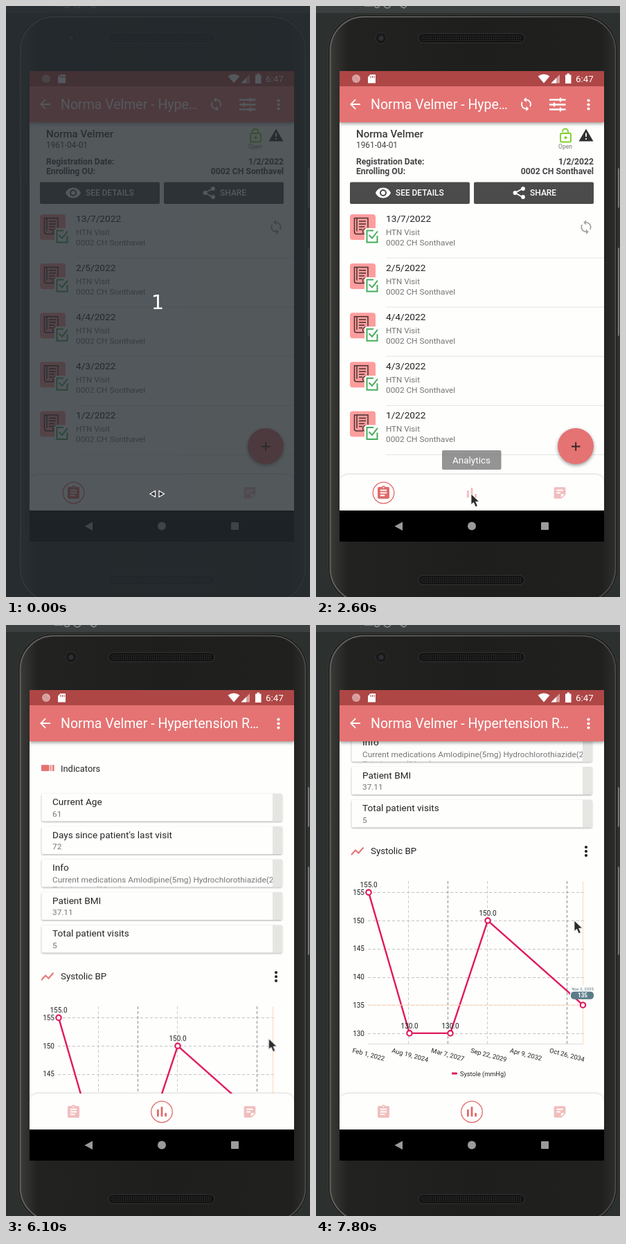
Write an HTML page that moves like this. It is 439 px wide and 854 px high and loops after 8000 ms.

```html
<!DOCTYPE html>
<html lang="en">
<head>
<meta charset="utf-8">
<title>Patient dashboard</title>
<style>
html, body { margin: 0; width: 100%; height: 100%; overflow: hidden; background: #2c302f; }
svg { display: block; width: 439px; height: 854px; font-family: Roboto, sans-serif; }
svg svg { width: auto; height: auto; }
.b { font-weight: 700; }
.m { font-weight: 500; }
.mid { text-anchor: middle; }
.end { text-anchor: end; }
.shadow { filter: drop-shadow(0 1px 1px rgba(0,0,0,.35)); }
.deep { filter: drop-shadow(0 2px 2.5px rgba(0,0,0,.4)); }

/* 1.25% of the loop is 100 ms; steps() keeps the ten pictures a second */
#dim, #cursor, #ripple, #tip, #list, #charts, #scroll, #marker,
#bar1, #bar2, #tab1, #tab2, #ring1, #ring2 { animation: 8s infinite linear; }

#dim { animation-name: dim; }
@keyframes dim {
  0% { opacity: 1; animation-timing-function: step-end; }
  1.25%, 100% { opacity: 0; }
}
#cursor { animation-name: cursor; }
@keyframes cursor {
  0% { opacity: 0; transform: translate(224px,705px); animation-timing-function: step-end; }
  5% { opacity: 1; transform: translate(224px,705px); }
  51.25% { transform: translate(224px,705px); animation-timing-function: steps(3); }
  55% { transform: translate(317px,592px); animation-timing-function: steps(3); }
  58.75% { transform: translate(381px,633px); }
  73.75% { transform: translate(381px,633px); animation-timing-function: steps(6); }
  81.25% { transform: translate(376px,527px); animation-timing-function: steps(5); }
  87.5% { transform: translate(374px,437px); animation-timing-function: steps(2); }
  90%, 100% { opacity: 1; transform: translate(373px,427px); }
}
#ripple { animation-name: ripple; transform-origin: 225px 703px; }
@keyframes ripple {
  0%, 3.75% { opacity: 0; transform: scale(.3); animation-timing-function: steps(3); }
  7.5% { opacity: 1; transform: scale(1); }
  23.75% { opacity: 1; transform: scale(1); animation-timing-function: steps(3); }
  27.5%, 100% { opacity: 0; transform: scale(1); }
}
#tip { animation-name: tip; }
@keyframes tip {
  0%, 7.5% { opacity: 0; animation-timing-function: steps(5); }
  13.75% { opacity: 1; }
  31.25% { opacity: 1; animation-timing-function: steps(4); }
  36.25%, 100% { opacity: 0; }
}
#list { animation-name: leave; }
@keyframes leave {
  0%, 36.25% { transform: none; animation-timing-function: steps(5); }
  42.5%, 100% { transform: translateX(-382px); }
}
#charts { animation-name: enter; }
@keyframes enter {
  0%, 36.25% { transform: translateX(382px); animation-timing-function: steps(5); }
  42.5%, 100% { transform: none; }
}
#scroll { animation-name: scroll; }
@keyframes scroll {
  0%, 75% { transform: none; animation-timing-function: steps(5); }
  81.25% { transform: translateY(-89.5px); animation-timing-function: steps(5); }
  87.5% { transform: translateY(-176.5px); animation-timing-function: steps(2); }
  90% { transform: translateY(-196.5px); }
  95% { transform: translateY(-196.5px); animation-timing-function: steps(2); }
  97.5%, 100% { transform: translateY(-199px); }
}
#marker { animation-name: marker; animation-timing-function: step-end; }
@keyframes marker { 0% { opacity: 0; } 75%, 100% { opacity: 1; } }

#bar1, #bar2, #tab1, #tab2, #ring1 { animation-timing-function: step-end; }
#bar1, #ring1 { animation-name: hide; }
#bar2 { animation-name: show; }
@keyframes hide { 0% { opacity: 1; } 37.5%, 100% { opacity: 0; } }
@keyframes show { 0% { opacity: 0; } 37.5%, 100% { opacity: 1; } }
#tab1 { animation-name: tabOff; }
#tab2 { animation-name: tabOn; }
@keyframes tabOff { 0% { fill: #e06a69; } 37.5%, 100% { fill: #f1bdbd; } }
@keyframes tabOn { 0% { fill: #fff; } 1.25% { fill: #f1bdbd; } 37.5%, 100% { fill: #e06a69; } }
#ring2 { animation-name: ring; transform-origin: 225px 703px; }
@keyframes ring {
  0%, 37.5% { opacity: 0; transform: scale(.5); animation-timing-function: steps(5); }
  43.75%, 100% { opacity: 1; transform: scale(1); }
}
</style>
</head>
<body>
<svg id="stage" viewBox="0 0 439 854" xmlns="http://www.w3.org/2000/svg"></svg>
<script>
const PATIENT = 'Norma Velmer', UNIT = '0002 CH Sonthavel';
const RED = '#e57373', LINE = '#e0195e', INK = '#222', GREY = '#767676', PAPER = '#fefefd';

const text = (x, y, s, size, fill = INK, cls = '', more = '') =>
  `<text x="${x}" y="${y}" font-size="${size}" fill="${fill}" class="${cls}" ${more}>${s}</text>`;
const rect = (x, y, w, h, fill, rx = 0, more = '') =>
  `<rect x="${x}" y="${y}" width="${w}" height="${h}" rx="${rx}" fill="${fill}" ${more}/>`;
const circle = (x, y, r, fill, more = '') => `<circle cx="${x}" cy="${y}" r="${r}" fill="${fill}" ${more}/>`;
const path = (d, fill = 'none', more = '') => `<path d="${d}" fill="${fill}" ${more}/>`;
const stroke = (d, colour, width, more = '') => path(d, 'none', `stroke="${colour}" stroke-width="${width}" ${more}`);
const icon = (d, x, y, k, fill) => path(d, fill, `transform="translate(${x - 12 * k} ${y - 12 * k}) scale(${k})"`);
const group = (id, s, more = '') => `<g id="${id}" ${more}>${s}</g>`;
const dots = (x, y, fill) => [-6, 0, 6].map(d => circle(x, y + d, 2.1, fill)).join('');

const SYNC = 'M12 4V1L8 5l4 4V6c3.31 0 6 2.69 6 6 0 1-.25 2-.7 2.8l1.46 1.46C19.54 15 20 13.6 20 12c0-4.42-3.58-8-8-8zm0 14c-3.31 0-6-2.69-6-6 0-1 .25-2 .7-2.8L5.24 7.74C4.46 9 4 10.4 4 12c0 4.42 3.58 8 8 8v3l4-4-4-4v3z';
const BACK = 'M20 11H7.8l5.6-5.6L12 4l-8 8 8 8 1.4-1.4L7.8 13H20z';
const EYE = 'M12 4.5C7 4.5 2.7 7.6 1 12c1.7 4.4 6 7.5 11 7.5s9.3-3.1 11-7.5c-1.7-4.4-6-7.5-11-7.5zM12 17a5 5 0 1 1 0-10 5 5 0 0 1 0 10zm0-8a3 3 0 1 0 0 6 3 3 0 0 0 0-6z';
const CLIP = 'M19 3h-4.2a3 3 0 0 0-5.6 0H5a2 2 0 0 0-2 2v14c0 1.1.9 2 2 2h14a2 2 0 0 0 2-2V5a2 2 0 0 0-2-2zm-7 0a1 1 0 1 1 0 2 1 1 0 0 1 0-2zm2 14H7v-2h7zm3-4H7v-2h10zm0-4H7V7h10z';
const NOTE = 'M5 3h14a2 2 0 0 1 2 2v10l-6 6H5a2 2 0 0 1-2-2V5a2 2 0 0 1 2-2zm2 4v2h10V7zm0 4v2h6v-2zm7 8.5 5.5-5.5H14z';

function phone() {
  const grille = y => rect(148, y, 153, 13, '#111', 6.5, 'stroke="#353535"') + rect(151, y + 2, 147, 9, 'url(#mesh)', 4);
  return rect(0, 0, 439, 854, '#2c302f') + rect(0, 0, 439, 10, '#3c4040') +
    stroke('M70 0h12M84 0q4 5 8 0M98 0q5 6 10 0M122 0l5 3 4-3', '#8a8d8f', 1.5) +
    rect(434, 234, 4, 58, '#747675', 2) + rect(434, 349, 4, 128, '#747675', 2) +
    rect(17.5, 12.5, 418, 852, '#171717', 52, 'stroke="#3a3b39"') +
    rect(20.5, 15.5, 412, 846, 'url(#body)', 49, 'stroke="url(#rim)" stroke-width="2"') +
    circle(94, 46.5, 8, '#191919', 'stroke="#303030"') + circle(94, 46.5, 3.5, '#2c3034') +
    grille(40) + grille(823);
}

function statusBar() {
  return rect(34, 94, 382, 22, '#ae4646') +
    circle(58, 105, 6, '#dba7a7') + stroke('M54 103l7 6M56 101l6 6M53 106l4 4', '#c98383', 1) +
    path('M78.5 99H86v12.5H75v-9z', '#fff') + stroke('M79 101v3M81.5 101v3M84 101v3', '#ae4646', 1) +
    path('M320.5 101.5q8.5-6 17 0L329 111.5z', '#fff') +
    path('M352 99v12.5h-12.5z', '#d79f9f') + path('M347 104v7.5h-7.5z', '#fff') +
    path('M360 99.5h2.5v-2h3.5v2h2.5v12.5H360z', '#fff') +
    text(375, 110, '6:47', 13.3, '#fff');
}

function toolbar() {
  const sliders = [[135.5, 353], [142.5, 344], [149.5, 353]].map(([y, x]) =>
    stroke(`M337 ${y}h23.5M${x} ${y - 3}v6`, '#fff', 2.3)).join('');
  return rect(34, 116, 382, 52, RED, 0, 'class="deep"') +
    icon(BACK, 56.5, 142, .93, '#fff') + dots(393.5, 142.5, '#fff') +
    group('bar1', text(79, 148.5, PATIENT + ' - Hype…', 19.5, '#fff') +
      icon(SYNC, 303.5, 142, .93, '#fff') + sliders) +
    group('bar2', text(79, 148.5, PATIENT + ' - Hypertension R…', 19.5, '#fff'));
}

function visit(date, i) {
  return `<g transform="translate(0 ${i * 71.1})">` +
    rect(49, 301, 37, 37, '#fd9d9d', 4) +
    stroke('M68 329.5H58.5q-3 0-3-3V306.5h19.5v14M59 306.5v19M62 311h10M62 315h10M62 319h8M62 323h5', '#493131', 1.5) +
    circle(71.5, 326, 4, 'none', 'stroke="#493131" stroke-width="1.4"') +
    rect(70, 321, 21.5, 23, PAPER, 4) +
    stroke('M83 324.5H73.5v17H88.5V332M76.5 331l4.500 4.500 8-10', '#45ac5c', 2) +
    text(101, 312, date, 13.7) + text(101, 330.5, 'HTN Visit', 11.6, GREY) + text(101, 346, UNIT, 11.8, GREY) +
    rect(101, 363.5, 315, 1, '#e3e3e3') + '</g>';
}

function listPage() {
  const label = '#444';
  return text(58, 189.5, PATIENT, 15, '#3b3b3b', 'm') + text(58, 205, '1961-04-01', 11.9, label) +
    rect(353, 184, 15, 12.5, 'none', 1.5, 'stroke="#7fd02b" stroke-width="1.9"') +
    stroke('M356 182v-.5a4 4 0 0 1 8 0v2.5', '#7fd02b', 1.9) + circle(360.5, 190.3, 2, '#7fd02b') +
    text(360, 206, 'Open', 8.5, GREY, 'mid') +
    path('M390 177.5l10.5 18h-21z', '#303030') + stroke('M390 183.5v5.5M390 191v2', '#fff', 1.8) +
    text(58, 229, 'Registration Date:', 12.2, label, 'b') + text(401, 229, '1/2/2022', 12.2, label, 'b end') +
    text(58, 243, 'Enrolling OU:', 12.2, label, 'b') + text(401, 243, UNIT, 12.2, label, 'b end') +
    rect(49, 254.5, 173, 31.5, '#4b4b4b', 2) + rect(228, 254.5, 173, 31.5, '#4b4b4b', 2) +
    icon(EYE, 97, 270, 1, '#fff') + text(115, 274, 'SEE DETAILS', 11.9, '#fff', 'm') +
    stroke('M299 263.5L287.5 270L299 276.5', '#fff', 1.8) +
    circle(299, 264, 2.9, '#fff') + circle(287.5, 270, 2.9, '#fff') + circle(299, 276, 2.9, '#fff') +
    text(309, 274, 'SHARE', 12, '#fff', 'm') +
    ['13/7/2022', '2/5/2022', '4/4/2022', '4/3/2022', '1/2/2022'].map(visit).join('') +
    icon(SYNC, 390, 319.5, .95, '#a6a6a6') +
    circle(375, 636, 26, RED, 'class="deep"') +
    stroke('M369 636.5h12.5M375.2 630.3v12.5', '#2e2828', 1.8);
}

function card([title, value, extra], i) {
  const y = 261.5 + i * 47.5;
  return rect(51.5, y, 347, 40, PAPER, 2, 'class="shadow"') + rect(385, y, 13.5, 40, '#e5e5e2', 1) +
    text(67, y + 16.5, title, 13.6) +
    `<svg x="51" y="${y}" width="334" height="40" style="width:334px;height:40px">` +
    text(16, 33, value, 11.8, GREY) + (extra ? text(16, 47, extra, 11.8, GREY) : '') + '</svg>';
}

function chart() {
  const px = [76, 135, 194, 248, 385.5], values = [155, 130, 130, 150, 135];
  const y = v => 585.4 + (155 - v) * 8.14;
  const ticks = [155, 150, 145, 140, 135, 130];
  const dates = ['Feb 1, 2022', 'Aug 19, 2024', 'Mar 7, 2027', 'Sep 22, 2029', 'Apr 9, 2032', 'Oct 26, 2034'];
  const end = y(135);
  const grid = (d, colour) => stroke(d, colour, 1, 'stroke-dasharray="4 3"');
  return ticks.map(v => grid(`M75 ${Math.round(y(v)) + .5}H388`, '#c2c2c2') +
      text(70, y(v) + 3.6, v, 10, INK, 'end')).join('') +
    [133.5, 190.5, 247.5, 362.5].map((x, i) => grid(`M${x} 569V805`, i % 2 ? '#8c8c8c' : '#cacaca')).join('') +
    stroke('M75 804.5H386', '#dcdcdc', 1) +
    dates.map((s, i) => text(0, 0, s, 9.3, INK, '', `transform="translate(${52 + i * 56.9} 816.5) rotate(15)"`)).join('') +
    stroke('M' + px.map((x, i) => `${x} ${y(values[i])}`).join('L'), LINE, 2.4, 'stroke-linejoin="round"') +
    group('marker', stroke(`M385.5 569V805M75 ${end}H388`, '#ffd9b8', 1) +
      rect(367, end - 28, 35, 18, PAPER) + rect(368, end - 19.5, 33, 11, '#5c7b88', 4.5) +
      text(385, end - 21, 'Nov 2, 2035', 6, '#56707b', 'mid') + text(385, end - 11, '135', 8.2, '#fff', 'b mid')) +
    px.map((x, i) => circle(x, y(values[i]), 3.7, PAPER, `stroke="${LINE}" stroke-width="2.2"`) +
      (i < 4 ? text(x, y(values[i]) - 7, values[i].toFixed(1), 10, INK, 'mid') : '')).join('') +
    rect(196, 845.5, 8, 3, LINE, 1) + text(208, 850.5, 'Systole (mmHg)', 9.2);
}

function chartPage() {
  const cards = [['Current Age', 61], ["Days since patient's last visit", 72],
    ['Info', 'Current medications Amlodipine(5mg) Hydrochlorothiazide(25mg)', 'Telmisartan(20mg)'],
    ['Patient BMI', '37.11'], ['Total patient visits', 5]];
  return group('scroll', text(49, 185, 'Charts and indicators', 13.1, INK, 'b') +
    rect(51, 220, 11.5, 9, RED, 1) + rect(63.5, 220, 2.5, 9, '#e99') + rect(67, 220, 2.5, 9, RED) +
    text(79, 229.5, 'Indicators', 12.9) + cards.map(card).join('') +
    stroke('M51 531l6-6.5 4.5 4 7-8', RED, 2) + text(79, 529.5, 'Systolic BP', 13.3) + dots(390, 526, INK) + chart());
}

function tabs() {
  const ring = (id, x) => circle(x, 703.5, 15.3, 'none', `id="${id}" stroke="#df6968" stroke-width="1.3"`);
  return path('M34 729V691q0-14 14-14H402q14 0 14 14V729z', PAPER, 'style="filter:drop-shadow(0 -1px 1px rgba(0,0,0,.15))"') +
    `<g clip-path="url(#tabsClip)">${circle(225, 703, 69, '#e8f6fd', 'id="ripple"')}</g>` +
    ring('ring1', 97.5) + ring('ring2', 225) +
    group('tab1', icon(CLIP, 97.5, 703.5, .94, 'inherit')) +
    group('tab2', rect(218, 700, 2.8, 10.5, 'inherit', 1) + rect(223.6, 696, 2.8, 14.5, 'inherit', 1) + rect(229.2, 705, 2.8, 5.5, 'inherit', 1)) +
    icon(NOTE, 352, 703.5, .93, '#f1bdbd');
}

const systemBar = () => rect(34, 729, 382, 45, '#000') +
  path('M125 745.5v12.5l-11.5-6.2z', '#9b9b9b') + circle(225, 751.5, 6, '#9b9b9b') + rect(325, 746, 11, 11, '#9b9b9b', 1);

document.getElementById('stage').innerHTML = `<defs>
  <linearGradient id="body" x1="0" y1="0" x2="1" y2="0">
    <stop offset="0" stop-color="#3a3b38"/><stop offset=".06" stop-color="#222321"/>
    <stop offset=".5" stop-color="#1e1f1d"/><stop offset=".95" stop-color="#20211f"/><stop offset="1" stop-color="#2d2e2b"/>
  </linearGradient>
  <linearGradient id="rim" x1="0" y1="0" x2="1" y2="0">
    <stop offset="0" stop-color="#62625e"/><stop offset="1" stop-color="#4a4a47"/>
  </linearGradient>
  <pattern id="mesh" width="3" height="3" patternUnits="userSpaceOnUse">${circle(1.5, 1.5, .8, '#3d3d3d')}</pattern>
  <clipPath id="page">${rect(34, 168, 382, 561, '#000')}</clipPath>
  <clipPath id="tabsClip">${rect(34, 677, 382, 52, '#000')}</clipPath>
  <clipPath id="screen">${rect(34, 94, 382, 680, '#000')}</clipPath>
</defs>` + phone() + `<g clip-path="url(#screen)">` + rect(34, 94, 382, 680, PAPER) +
  `<g clip-path="url(#page)">${group('list', listPage())}${group('charts', chartPage())}</g>` +
  toolbar() + statusBar() + tabs() + systemBar() + '</g>' +
  group('tip', rect(182, 642, 85.5, 28, '#707070', 2) + text(224.5, 660.5, 'Analytics', 13.5, '#fff', 'mid')) +
  group('cursor', path('M0 0V15.5l3.6-3.100 2.700 6.400 3.100-1.300-2.700-6.200h5z', '#2b2b2b', 'stroke="#fff" stroke-width=".8"')) +
  group('dim', rect(0, 0, 439, 854, 'rgba(38,44,49,.79)') +
    text(219, 438, '1', 29, '#fff', 'mid', 'style="font-family:\'DejaVu Sans\',sans-serif"') +
    path('M215.5 700.5v9l-7.5-4.5zM221 700.5v9l7.5-4.5z', '#333', 'stroke="#fff" stroke-width="1.2"'));
</script>
</body>
</html>
```
